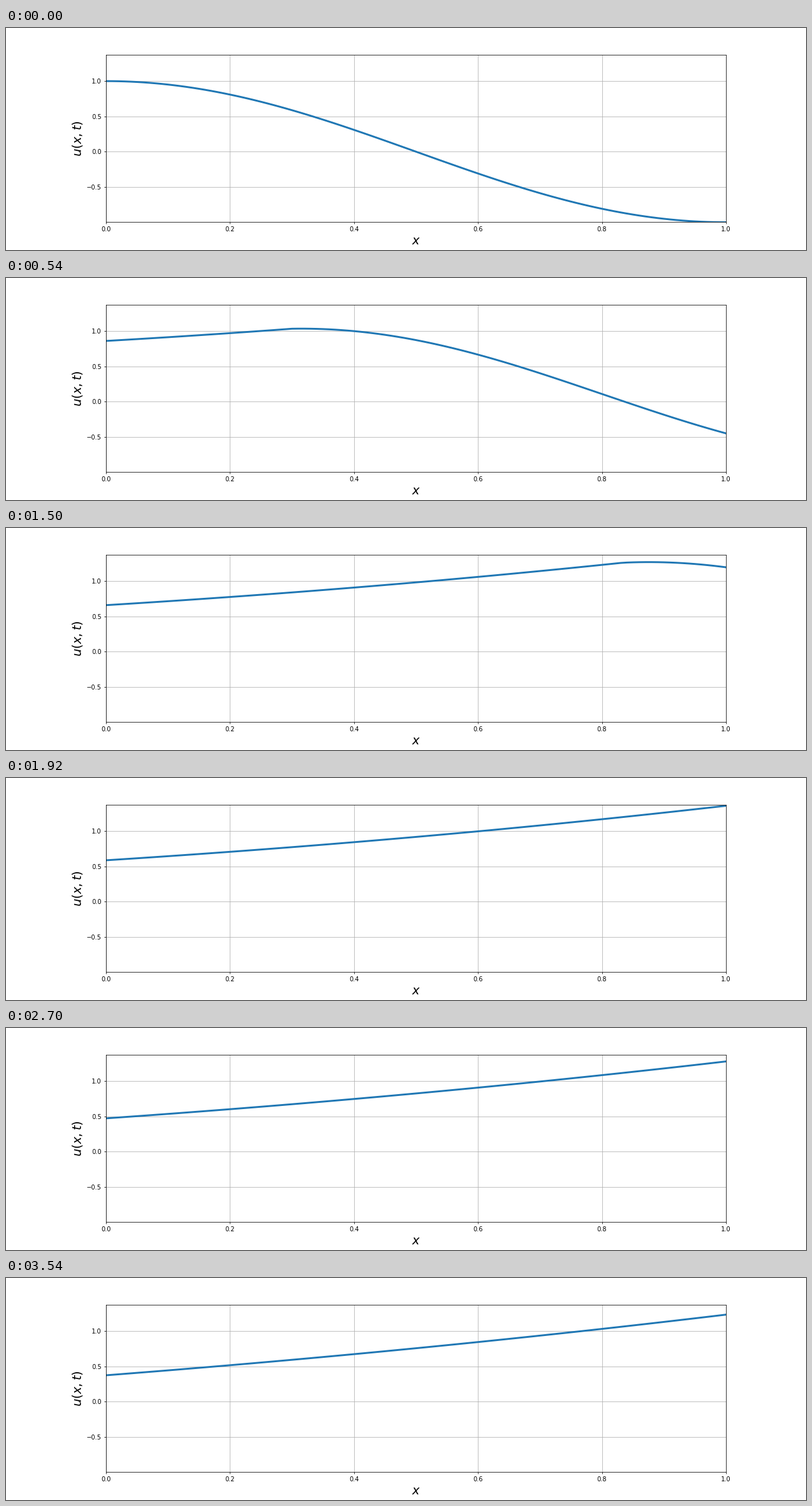
Animation, 1280 px wide and 356 px high, one loop 3.6 s. Source, as a matplotlib script:

```python
import numpy as np
import matplotlib.pyplot as plt
from matplotlib.animation import FuncAnimation

FRAMES = 60
INTERVAL = 60
SPEED = 2.0

x = np.linspace(0, 1, 101)


def solution(t):
    """Solve u_t + 2 u_x = x + t, with u(x, 0) = cos(pi x) and u(0, t) = exp(-t)."""
    # Follow each characteristic back to the initial line or the left edge.
    age = np.minimum(t, x / SPEED)
    x0 = x - SPEED * age
    t0 = t - age
    start = np.where(x0 > 0, np.cos(np.pi * x0), np.exp(-t0))
    return start + (x0 + t0) * age + (SPEED + 1) * age**2 / 2


# 1280 x 356 pixels
fig, ax = plt.subplots(figsize=(18, 5.00625), dpi=71.1112)
fig.subplots_adjust(left=0.125, right=0.9, bottom=0.125, top=0.88)
ax.set_xlim(0, 1)
ax.set_ylim(-1, 1.375)
ax.set_yticks([-0.5, 0, 0.5, 1])
ax.set_xlabel("$x$", fontsize=20)
ax.set_ylabel("$u(x,t)$", fontsize=20)
ax.grid(True)
line, = ax.plot(x, solution(0), lw=3)


def update(frame):
    line.set_ydata(solution(frame / FRAMES))
    return line,


anim = FuncAnimation(fig, update, frames=FRAMES, interval=INTERVAL,
                     repeat=True, repeat_delay=0)
plt.show()
```
